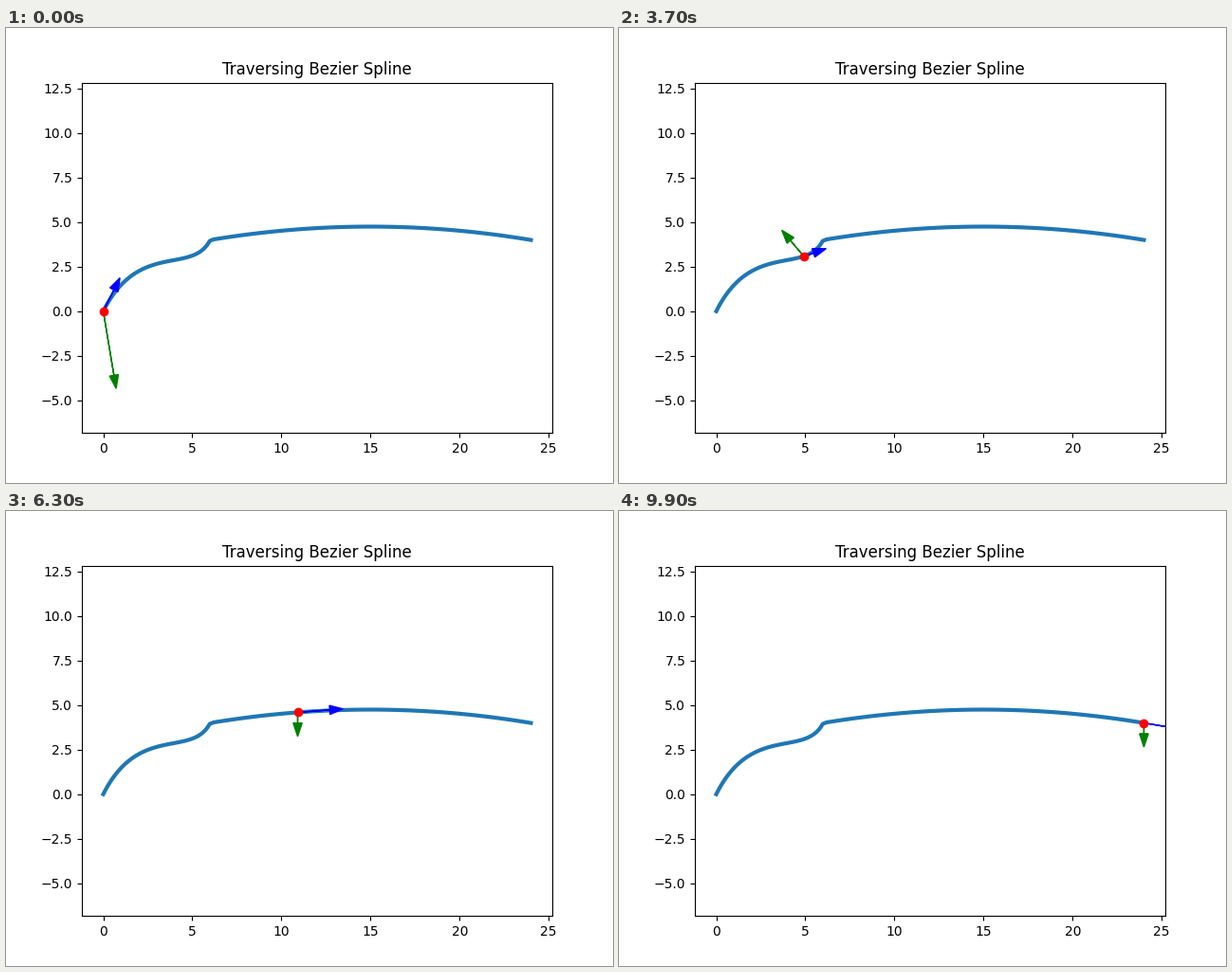
Write a matplotlib script that moves like this. It is 640 px wide and 480 px high and loops after 10 s.

```python
import numpy as np
import matplotlib.pyplot as plt
from matplotlib.animation import FuncAnimation

FRAMES = 100
SCALE = 0.1  # arrow length per unit of derivative

SEGMENTS = np.array([
    [(0, 0), (2, 4), (5, 2), (6, 4)],
    [(6, 4), (12, 5), (18, 5), (24, 4)],
], dtype=float)


def spline(t):
    """Position, first and second derivative at spline parameter t."""
    i = min(int(t), len(SEGMENTS) - 1)
    u = t - i
    v = 1 - u
    p = SEGMENTS[i]
    d1 = 3 * np.diff(p, axis=0)
    d2 = 2 * np.diff(d1, axis=0)
    pos = v**3 * p[0] + 3 * u * v**2 * p[1] + 3 * u**2 * v * p[2] + u**3 * p[3]
    vel = v**2 * d1[0] + 2 * u * v * d1[1] + u**2 * d1[2]
    acc = v * d2[0] + u * d2[1]
    return pos, vel, acc


samples = [spline(t) for t in np.linspace(0, len(SEGMENTS), FRAMES)]
path = np.array([s[0] for s in samples])

fig, ax = plt.subplots(figsize=(6.4, 4.8), dpi=100)
ax.set_title("Traversing Bezier Spline")
ax.plot(path[:, 0], path[:, 1], lw=3)

# equal scale on both axes, centred on y = 3
box = ax.get_position()
half = 13.2 * (box.height * 4.8) / (box.width * 6.4)
ax.set(xlim=(-1.2, 25.2), ylim=(3 - half, 3 + half))


def make_arrow(color):
    return ax.arrow(0, 0, 1, 1, head_width=0.5, color=color, zorder=2.5)


velocity = make_arrow("blue")
acceleration = make_arrow("green")
dot, = ax.plot([], [], "ro", zorder=3)


def update(n):
    (x, y), vel, acc = samples[n]
    for arrow, vec in ((velocity, vel), (acceleration, acc)):
        dx, dy = SCALE * vec
        arrow.set_data(x=x, y=y, dx=dx, dy=dy)
    dot.set_data([x], [y])
    return velocity, acceleration, dot


anim = FuncAnimation(fig, update, frames=FRAMES, interval=100, repeat=True)
plt.show()
```
